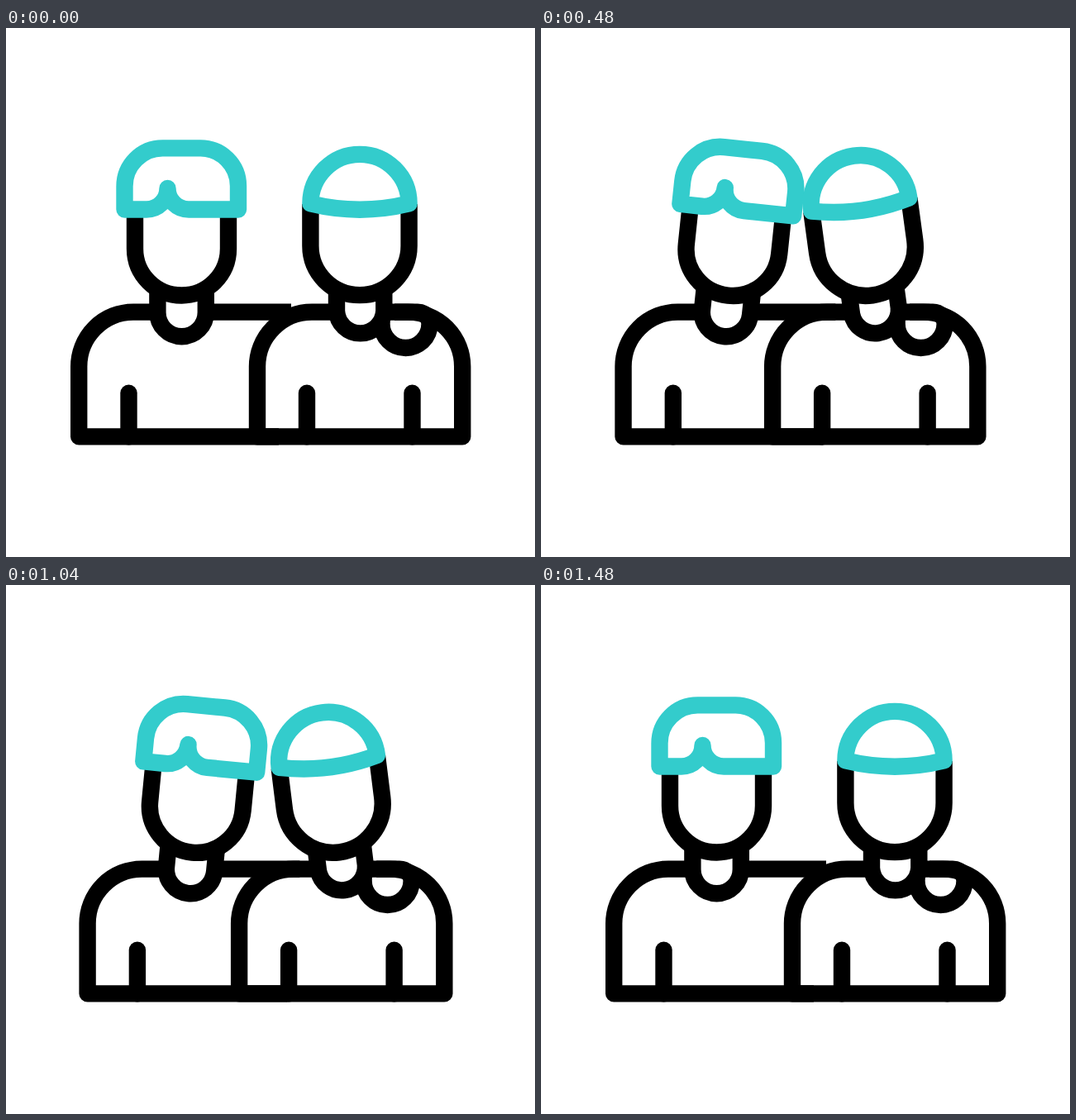
These frames come from a looping animation (640 by 640 pixels, 2040 ms). An HTML page:

```html
<!DOCTYPE html>
<html lang="en">
<head>
<meta charset="utf-8">
<title>Two friends</title>
<style>
  html, body { margin: 0; width: 100%; height: 100%; overflow: hidden; background: #fff; }
  svg { display: block; width: 100vw; height: 100vh; }
  path { fill: none; stroke: #000; stroke-width: 20.4; stroke-linejoin: round; }
  .round { stroke-linecap: round; }
  .skin { fill: #fff; }
  .teal path { stroke: #33cccc; stroke-linecap: round; }
</style>
</head>
<body>
<svg viewBox="0 0 640 640">
  <g class="bodyL">
    <path d="M345 343.6H154A66 66 0 0 0 88.2 410V494.4H330"/>
    <path class="round" d="M148.5 441.6V494.4"/>
  </g>
  <g class="bodyR">
    <path d="M304 494.4V410A66 66 0 0 1 370 343.6H486A66 66 0 0 1 552.2 410V494.4Z"/>
    <path class="round" d="M364 441.6V494.4M491.5 441.6V494.4"/>
  </g>
  <g class="headL">
    <path class="skin" d="M183.4 315V344A29.2 29.2 0 0 0 241.8 344V315"/>
    <path class="skin" d="M156 221V267A56.5 56.5 0 0 0 269 267V221"/>
  </g>
  <g class="headR">
    <path class="skin" d="M400 314V342.4A28.7 28.7 0 0 0 457.3 342.4V314"/>
    <path class="skin" d="M368.4 213V263.6A59.6 59.6 0 0 0 487.6 263.6V213"/>
  </g>
  <g class="bodyR">
    <path d="M470 343.6H498A14.5 14.5 0 0 1 512.5 358A29 29 0 0 1 454.5 358V354"/>
  </g>
  <g class="teal">
    <g class="headL">
      <path d="M195.5 194A25.5 25.5 0 0 0 221 219.5H281V191A45.7 45.7 0 0 0 235.3 145.4H189.5A46 46 0 0 0 143.5 191.4V219.5H170A25.5 25.5 0 0 0 195.5 194"/>
    </g>
    <g class="headR">
      <path d="M368.4 212.4A59.6 59.6 0 0 1 487.6 212.4Q428 227 368.4 212.4Z"/>
    </g>
    <path id="rays"/>
  </g>
</svg>
<script>
const LOOP = 2040, STEP = 40, MID = 740, LEAN = 680;
const RAYS = [[153, 139, 71, 61.5], [312.2, 115.5, 312.2, 32.5], [522, 134, 577, 53.5]];
const rays = document.getElementById('rays');

const clamp = v => Math.min(1, Math.max(0, v));
const smooth = v => { v = clamp(v); return v * v * (3 - 2 * v); };

// cubic-bezier(.6, 0, .4, 1)
function ease(x) {
  x = clamp(x);
  if (x === 0 || x === 1) return x;
  let lo = 0, hi = 1;
  for (let i = 0; i < 24; i++) {
    const m = (lo + hi) / 2, n = 1 - m;
    if (1.8 * n * n * m + 1.2 * n * m * m + m * m * m < x) lo = m; else hi = m;
  }
  return smooth(lo);
}

function move(name, transform) {
  for (const el of document.querySelectorAll('.' + name)) el.setAttribute('transform', transform);
}

function pose(side, dx, angle, px) {
  const shift = `translate(${dx} 0)`;
  move('body' + side, shift);
  move('head' + side, `${shift} rotate(${angle} ${px} 345)`);
}

function draw(t) {
  const lean = ease((MID - Math.abs(t - MID)) / LEAN);
  pose('L', 12.9 * lean, 6.85 * lean, 212.5);
  pose('R', -27.15 * lean, -8.8 * lean, 428);

  const head = smooth((t - 519) / 340), tail = smooth((t - 629) / 340);
  const at = ([x, y, u, v], k) => `${x + (u - x) * k} ${y + (v - y) * k}`;
  rays.setAttribute('d', head > tail ? RAYS.map(r => `M${at(r, tail)}L${at(r, head)}`).join('') : '');
}

const start = performance.now();
function tick(now) {
  const t = Math.max(0, now - start) % LOOP;
  draw(Math.floor(t / STEP) * STEP);
  requestAnimationFrame(tick);
}
draw(0);
requestAnimationFrame(tick);
</script>
</body>
</html>
```
